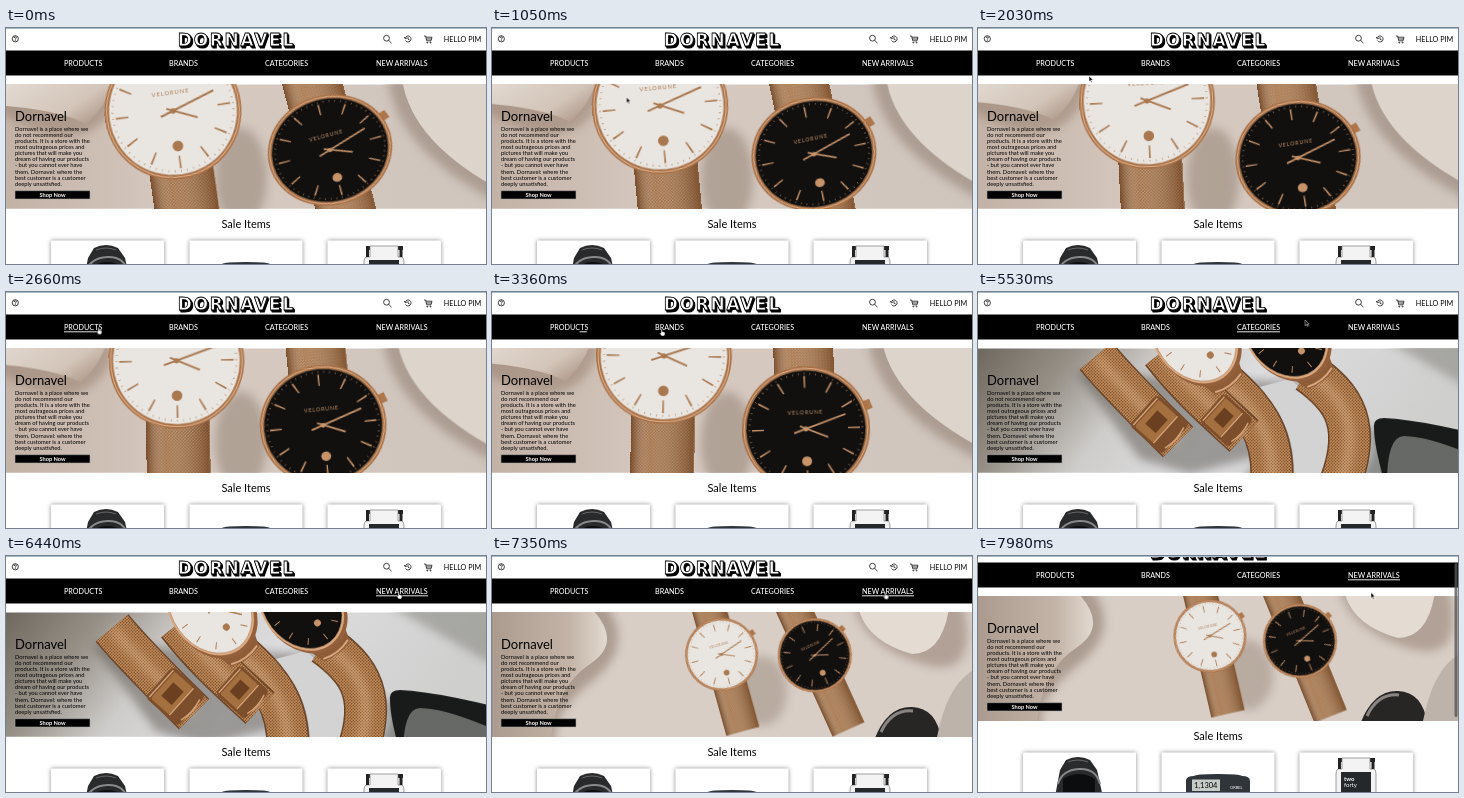
Recreate the animation shown at these times as an HTML page. Size 480 by 236 pixels, loop 8000 ms.

```html
<!DOCTYPE html>
<html lang="en">
<head>
<meta charset="utf-8">
<title>Watch store</title>
<style>
html, body { margin: 0; width: 100%; height: 100%; overflow: hidden; background: #fff; }
svg { display: block; width: 100%; height: 100%; font-family: Lato, sans-serif; }

.nav text { fill: #fff; font-size: 7.2px; font-weight: 500; }
.logo { font: bold 17px "DejaVu Sans", sans-serif; letter-spacing: 1.7px; text-anchor: middle; stroke: #000; }
.icon { fill: none; stroke: #111; stroke-width: .8; }
.copy { font-size: 5.75px; }
.menu { font-size: 6.2px; }
.card { fill: #fff; filter: drop-shadow(0 0 2px #0007); }
.mid { text-anchor: middle; }
.light { --dial: #e9e6e2; --ink: #a9784f; }
.dark { --dial: #11100f; --ink: #c7936a; }
.band { fill: none; }
.edge { stroke: #6b4427; stroke-width: 43; }
.mesh { stroke: url(#mesh); stroke-width: 40; }
.gloss { stroke: #f0cba4; stroke-width: 9; opacity: .4; filter: url(#soft); }

/* Everything shares one 8 s timeline. */
.page, .move, .line, .cursor { animation: 8s linear infinite; }
.cut { animation: 8s step-end infinite; }

.page { animation-name: scroll; }
@keyframes scroll {
  0%, 94.2% { transform: none; }
  94.6% { transform: translateY(-1px); }
  97.5% { transform: translateY(-11px); }
  99.5%, 100% { transform: translateY(-16px); }
}

.scene-a { animation-name: showA; }
.scene-b { animation-name: showB; }
.scene-c { animation-name: showC; }
.menu { animation-name: showMenu; }
.bar { animation-name: showBar; }
@keyframes showA { 0% { visibility: visible; } 47.2%, 100% { visibility: hidden; } }
@keyframes showB { 0%, 90%, 100% { visibility: hidden; } 47.2% { visibility: visible; } }
@keyframes showC { 0% { visibility: hidden; } 90%, 100% { visibility: visible; } }
@keyframes showMenu { 0%, 55.2%, 100% { visibility: hidden; } 43.8% { visibility: visible; } }
@keyframes showBar { 0% { visibility: hidden; } 94.6%, 100% { visibility: visible; } }

.a-light { animation-name: aLight; }
.a-dark { animation-name: aDark; }
.a-back { animation-name: aBack; }
.b-all { animation-name: bAll; }
.c-light { animation-name: cLight; }
.c-dark { animation-name: cDark; }
@keyframes aLight {
  0% { transform: translate(167px, 83px) rotate(-8deg) scale(1.07); }
  25.4% { transform: translate(169px, 73px) rotate(-3deg) scale(1.06); }
  42% { transform: translate(172px, 64px) rotate(1deg) scale(1.06); }
  48%, 100% { transform: translate(173px, 61px) rotate(2.5deg) scale(1.06); }
}
@keyframes aDark {
  0% { transform: translate(324px, 122px) rotate(-15deg) scale(.98, .86); }
  25.4% { transform: translate(320px, 130px) rotate(-9deg) scale(.98, .91); }
  42% { transform: translate(314px, 137px) rotate(-2deg) scale(1, .98); }
  48%, 100% { transform: translate(312px, 139px) rotate(0deg) scale(1); }
}
@keyframes aBack { 0% { transform: none; } 48%, 100% { transform: translate(-8px, -8px); } }
@keyframes bAll {
  0%, 47.2% { transform: translate(31px, -17px); }
  53.4% { transform: translate(26px, -14px); }
  69.1% { transform: translate(12px, -8px); }
  80.5% { transform: none; }
  90%, 100% { transform: translate(-10px, 5px); }
}
@keyframes cLight {
  0%, 90% { transform: translate(229px, 99px) rotate(-16deg) scale(.57); }
  100% { transform: translate(232px, 96px) rotate(-13deg) scale(.57); }
}
@keyframes cDark {
  0%, 90% { transform: translate(323px, 99px) rotate(-25deg) scale(.58); }
  100% { transform: translate(322px, 101px) rotate(-22deg) scale(.58); }
}

/* Underlines enter from the left and leave to the right. */
.line { stroke: #fff; stroke-width: .9; stroke-dasharray: 1 2; }
.l-products { animation-name: lProducts; }
.l-brands { animation-name: lBrands; }
.l-categories { animation-name: lCategories; }
.l-new { animation-name: lNew; }
@keyframes lProducts {
  0%, 28.8% { stroke-dashoffset: 1; } 31.8%, 39.7% { stroke-dashoffset: 0; } 42.6%, 100% { stroke-dashoffset: -1; }
}
@keyframes lBrands {
  0%, 42.1% { stroke-dashoffset: 1; } 45%, 55% { stroke-dashoffset: 0; } 58%, 100% { stroke-dashoffset: -1; }
}
@keyframes lCategories {
  0%, 58.8% { stroke-dashoffset: 1; } 61.8%, 69.2% { stroke-dashoffset: 0; } 72.2%, 100% { stroke-dashoffset: -1; }
}
@keyframes lNew {
  0%, 76% { stroke-dashoffset: 1; } 79%, 100% { stroke-dashoffset: 0; }
}

.cursor { animation-name: roam; stroke-linejoin: round; }
.arrow { animation-name: arrow; }
.hand { animation-name: hand; }
@keyframes roam {
  0%, 11.4% { transform: translate(140px, 75px); }
  20% { transform: translate(113px, 47px); }
  25.4% { transform: translate(111px, 48px); }
  30.6% { transform: translate(91px, 35px); }
  37% { transform: translate(93px, 36px); }
  41.2%, 47% { transform: translate(169px, 37px); }
  53.4% { transform: translate(199px, 34px); }
  60% { transform: translate(275px, 33px); }
  65% { transform: translate(291px, 32px); }
  69.1% { transform: translate(327px, 28px); }
  71.3% { transform: translate(336px, 27px); }
  76.2% { transform: translate(384px, 33px); }
  80.5% { transform: translate(392px, 36px); }
  100% { transform: translate(393px, 36.5px); }
}
@keyframes arrow {
  0%, 28.8%, 40.6%, 58.1%, 75.6% { visibility: hidden; }
  11.4%, 37.5%, 54.4%, 66.3%, 95.6%, 100% { visibility: visible; }
}
@keyframes hand {
  0%, 37.5%, 54.4%, 66.3%, 95.6%, 100% { visibility: hidden; }
  28.8%, 40.6%, 58.1%, 75.6% { visibility: visible; }
}
</style>
</head>
<body>
<svg viewBox="0 0 480 236" preserveAspectRatio="none">
  <defs>
    <clipPath id="hero"><path d="M0 56.500H480V180.700H0z"/></clipPath>
    <pattern id="mesh" width="3" height="3" patternUnits="userSpaceOnUse">
      <path fill="#a87345" d="M0 0H3V3H0z"/>
      <path stroke="#744726" stroke-width=".8" d="M0 0L3 3"/>
      <path stroke="#cd9c6d" stroke-width=".7" d="M0 3L3 0"/>
    </pattern>
    <linearGradient id="shade">
      <stop stop-color="#5c3519" stop-opacity=".6"/>
      <stop offset=".3" stop-color="#fff" stop-opacity=".12"/>
      <stop offset="1" stop-color="#5c3519" stop-opacity=".5"/>
    </linearGradient>
    <linearGradient id="sand">
      <stop stop-color="#c3b2a6"/><stop offset=".35" stop-color="#d6c9c0"/><stop offset="1" stop-color="#cfc5bd"/>
    </linearGradient>
    <linearGradient id="stone" x2="1" y2=".6">
      <stop stop-color="#e6ded6"/><stop offset=".75" stop-color="#d3c5b9"/><stop offset="1" stop-color="#b5a192"/>
    </linearGradient>
    <linearGradient id="mist" x2="1" y2=".2">
      <stop stop-color="#6f685f"/><stop offset=".2" stop-color="#969087"/>
      <stop offset=".38" stop-color="#cfcdcb"/><stop offset=".6" stop-color="#dcdcde"/>
      <stop offset="1" stop-color="#cfcfce"/>
    </linearGradient>
    <linearGradient id="rock">
      <stop stop-color="#a8988c"/><stop offset=".7" stop-color="#c3b4a7"/><stop offset="1" stop-color="#e2d9d0"/>
    </linearGradient>
    <filter id="soft" x="-30%" y="-30%" width="160%" height="160%"><feGaussianBlur stdDeviation="5"/></filter>

    <g id="watch">
      <path fill="url(#mesh)" d="M-30-140H30V140H-30z"/>
      <path fill="url(#shade)" d="M-30-140H30V140H-30z"/>
      <path fill="#ad774b" d="M62-5h8v10h-8z" transform="rotate(-20)"/>
      <circle r="64" fill="#a86f45"/>
      <circle r="62" fill="none" stroke="#e0b48f"/>
      <g style="stroke:var(--ink);fill:none">
        <circle r="60" style="fill:var(--dial)" stroke-width=".5"/>
        <circle r="56.5" pathLength="60" stroke-width="2" stroke-dasharray=".09 .91" stroke-dashoffset=".04"/>
        <circle r="48" pathLength="12" stroke-width="12" stroke-dasharray=".06 .94" stroke-dashoffset=".03"/>
        <path stroke-width="1.8" d="M-12 4L40-14M-6-3L22 9"/>
      </g>
      <g style="fill:var(--ink)">
        <circle r="2.5"/><circle cy="33" r="5"/>
        <text class="mid" y="-15" font-size="5.4" letter-spacing=".9">VELORUNE</text>
      </g>
    </g>

    <!-- Watch head seen at a slant -->
    <g id="head">
      <path fill="#8f5c38" d="M-24 38L-17 60Q0 66 17 60L24 38z"/>
      <path fill="none" stroke="#dba981" stroke-width="2" d="M-16 58Q0 64 16 58"/>
      <ellipse cx="1" cy="3" rx="41" ry="52" fill="#94603b"/>
      <ellipse rx="40" ry="51" fill="#dba981"/>
      <g style="stroke:var(--ink);fill:none">
        <ellipse rx="38" ry="48.500" style="fill:var(--dial)" stroke-width=".5"/>
        <ellipse rx="31" ry="41" stroke-width="7" pathLength="12" stroke-dasharray=".05 .95" stroke-dashoffset=".025"/>
        <path stroke-width="1.400" d="M-6-8L22 24M-4 4L8-20"/>
      </g>
      <circle cx="2" cy="25" r="3.500" style="fill:var(--ink)"/>
    </g>

    <g id="clasp">
      <rect x="-20" y="-21" width="44" height="42" rx="5" fill="#7d4e2b"/>
      <rect x="-15" y="-18" width="24" height="36" rx="2" fill="#a4703f"/>
      <path fill="none" stroke="#d5a377" stroke-width="1.500" d="M-17-18V18M10-18V18M22-14Q26 0 22 14"/>
      <path fill="#6b4020" d="M-9-9H5V9H-9z"/>
    </g>

    <path id="strap1" d="M106 72C133 104 160 130 188 158"/>
    <path id="strap2" d="M172 68C200 104 226 126 254 152"/>
    <path id="strap3" d="M222 88C262 122 290 148 280 215"/>
    <path id="strap4" d="M318 88C352 112 376 140 346 210"/>
  </defs>

  <path fill="#fff" d="M0 0H480V236H0z"/>
  <g class="page">
    <g class="icon">
      <circle cx="9.3" cy="10.8" r="3.1"/>
      <path d="M8.2 10q0-1.2 1.1-1.2t1.1 1q0 .6-1.1 1.2v.5M9.3 12.2v.8"/>
      <circle cx="380.5" cy="10.2" r="2.9"/><path d="M382.6 12.3L385.5 15.2"/>
      <path d="M399.5 12.5A3 3 0 1 0 399.3 9.8M398.2 9l1 1.8 1.8-.8M402 9v2.2l1.6.8"/>
      <path d="M418 8h1.6l1.2 4.8h4.2l1-3.6h-6M420.500 11h5"/>
      <circle cx="421.3" cy="14.6" r=".5"/><circle cx="424.6" cy="14.6" r=".5"/>
    </g>
    <g class="logo">
      <text x="232" y="20" stroke-width="1">DORNAVEL</text>
      <text x="231.2" y="19.2" stroke-width="1">DORNAVEL</text>
      <text x="230.4" y="18.2" fill="#fff" stroke-width=".8">DORNAVEL</text>
    </g>
    <text class="mid" x="456.5" y="14.4" font-size="7.2">HELLO PIM</text>

    <g class="nav">
      <path d="M0 22.500H480V47.500H0z"/>
      <text x="58" y="38">PRODUCTS</text>
      <text x="163" y="38">BRANDS</text>
      <text x="259" y="38">CATEGORIES</text>
      <text x="370" y="38">NEW ARRIVALS</text>
      <path class="line l-products" pathLength="1" d="M58 39.8H95"/>
      <path class="line l-brands" pathLength="1" d="M163 39.8H191"/>
      <path class="line l-categories" pathLength="1" d="M259 39.8H302"/>
      <path class="line l-new" pathLength="1" d="M370 39.8H422"/>
    </g>

    <g clip-path="url(#hero)">
      <g class="cut scene-a">
        <path fill="url(#sand)" d="M0 56H480V181H0z"/>
        <g class="move a-back">
          <path fill="#927b6b" opacity=".5" filter="url(#soft)" d="M-10 50H116Q112 92 80 105T-10 82z"/>
          <path fill="url(#stone)" d="M-10 50H108Q101 78 80 96Q55 82 -10 77z"/>
          <path fill="#8f7c6e" opacity=".55" filter="url(#soft)" d="M382 50Q390 125 500 178V50z"/>
          <path fill="#ddd4cb" d="M396 50Q404 115 500 165V50z"/>
        </g>
        <ellipse cx="235" cy="150" rx="26" ry="50" fill="#715b4c" opacity=".35" filter="url(#soft)"/>
        <use class="move a-light light" href="#watch"/>
        <use class="move a-dark dark" href="#watch"/>
      </g>

      <g class="cut scene-b">
        <path fill="url(#mist)" d="M0 56H480V181H0z"/>
        <g class="move b-all">
          <path fill="#8b8a84" opacity=".6" filter="url(#soft)" d="M350 30L520 128V30z"/>
          <path fill="#4e4640" opacity=".45" filter="url(#soft)" d="M86 88L150 175 200 190 275 170 240 210H350L385 150 330 100z"/>
          <path fill="#d4d3d4" d="M262 105Q308 130 304 205H342Q362 145 300 95z"/>
          <path fill="#5c5f5b" opacity=".6" filter="url(#soft)" d="M350 215Q384 185 386 143L520 165V215z"/>
          <path fill="#666965" d="M394 205Q386 165 387 140Q420 138 540 172V240z"/>
          <path fill="#191b1a" d="M384 143Q383 134 394 134Q440 136 540 164V198Q450 152 414 152Q396 152 397 205Q384 165 384 143z"/>

          <g class="band">
            <use class="edge" href="#strap4"/><use class="mesh" href="#strap4"/><use class="gloss" href="#strap4"/>
            <use class="edge" href="#strap3"/><use class="mesh" href="#strap3"/><use class="gloss" href="#strap3"/>
            <use class="edge" href="#strap2"/><use class="mesh" href="#strap2"/><use class="gloss" href="#strap2"/>
            <use class="edge" href="#strap1"/><use class="mesh" href="#strap1"/><use class="gloss" href="#strap1"/>
          </g>
          <use href="#clasp" transform="translate(168 139) rotate(42)"/>
          <use href="#clasp" transform="translate(235 135) rotate(42) scale(.9)"/>
          <use class="light" href="#head" transform="translate(204 52) rotate(-36)"/>
          <use class="dark" href="#head" transform="translate(295 49) rotate(-38) scale(.97)"/>
        </g>
      </g>

      <g class="cut scene-c">
        <path fill="#d8cec6" d="M0 56H480V181H0z"/>
        <path fill="#806b5c" opacity=".5" filter="url(#soft)" d="M-10 45H112Q145 90 100 125T65 195H-10z"/>
        <path fill="url(#rock)" d="M-10 45H92Q135 84 98 108T58 195H-10z"/>
        <path fill="#8c7667" opacity=".5" filter="url(#soft)" d="M360 45Q370 90 430 108T470 45z"/>
        <path fill="#e4dcd3" d="M365 45Q370 84 420 98Q452 98 458 45z"/>
        <path fill="#272625" d="M380 190Q393 150 420 151T450 190z"/>
        <path fill="none" stroke="#8a8582" stroke-width="3" d="M389 176Q400 153 421 155"/>
        <path fill="#bdb3ab" d="M445 181Q455 130 480 115V181z"/>
        <ellipse cx="270" cy="135" rx="25" ry="35" fill="#715b4c" opacity=".3" filter="url(#soft)"/>
        <use class="move c-light light" href="#watch"/>
        <use class="move c-dark dark" href="#watch"/>
      </g>
    </g>

    <text x="9" y="93" font-size="13">Dornavel</text>
    <g class="copy" id="copy"></g>
    <path stroke="#aaa" stroke-width=".6" d="M9 162.7H84V171H9z"/>
    <text class="mid" x="46.5" y="168.9" font-size="5.7" font-weight="bold" fill="#fff">Shop Now</text>

    <text class="mid" x="240" y="199.8" font-size="11">Sale Items</text>
    <path class="card" d="M45 212.5H158V270H45z"/>
    <path class="card" d="M183.5 212.5H296.5V270H183.5z"/>
    <path class="card" d="M321.5 212.5H435V270H321.5z"/>

    <path fill="#292a2b" d="M88 220Q100 214 112 220L119 230 126 262H76L82 230z"/>
    <path fill="none" stroke="#85888a" stroke-width="2" d="M80 244Q84 230 101 229T122 244"/>
    <path fill="#0c0d0e" d="M85 256V239Q101 229 117 239V256z"/>
    <path fill="none" stroke="#666" d="M90 222Q100 218 110 222"/>

    <path fill="#30353a" d="M208 258V240Q209 236 216 236Q218 234 240 234T264 236Q272 236 272 241V258z"/>
    <path fill="#c5ccc8" d="M214 239.5H242V251H214z"/>
    <text x="216" y="248" font-size="7.5">1,1304</text>
    <text x="252" y="249" font-size="4" fill="#fff">ORBEL</text>

    <path fill="#222" d="M360 218H397V222H360z"/>
    <path fill="#f3f3f3" stroke="#777" stroke-width=".7" d="M364 218H392V229H396Q398 230 398 234V262H358V234Q358 230 360 229H364z"/>
    <path fill="#222" d="M360 222h3v7h-3zM393.5 222h3v7h-3z"/>
    <path fill="#25282a" d="M363 232H393V262H363z"/>
    <g font-size="6" fill="#fff">
      <text x="366" y="240.5" font-weight="bold">two</text>
      <text x="366" y="246.5">forty</text>
    </g>

    <g class="cut menu">
      <path fill="#d3d3d3" d="M158 44H244V260H158z"/>
      <g id="brands"></g>
    </g>
  </g>

  <path fill="#a4bccb" d="M0 0H480V.9H0z"/>
  <rect class="cut bar" x="476.5" y="7" width="3" height="154" rx="1.5" fill="#555" opacity=".8"/>
  <g class="cursor">
    <path class="cut arrow" stroke="#fff" stroke-width=".5" d="M0 0V5.6L1.3 4.4 2.2 6.4 3.1 6 2.2 4.1H4z"/>
    <path class="cut hand" fill="#fff" stroke="#000" stroke-width=".5" d="M0 .6Q.7-.5 1.3.6V2.6L4 3.2V5.3L3.3 7H.5L-1.5 4.3Q-1.4 3.2 0 4.2z"/>
  </g>
</svg>
<script>
function stack(id, x, y, step, rows) {
  const group = document.getElementById(id);
  rows.forEach((row, i) => {
    const text = document.createElementNS(group.namespaceURI, "text");
    text.setAttribute("x", x);
    text.setAttribute("y", y + i * step);
    text.textContent = row;
    group.append(text);
  });
}

stack("copy", 9, 103, 6.08, [
  "Dornavel is a place where we", "do not recommend our",
  "products. It is a store with the", "most outrageous prices and",
  "pictures that will make you", "dream of having our products",
  "- but you cannot ever have", "them. Dornavel: where the",
  "best customer is a customer", "deeply unsatisfied."
]);
stack("brands", 162, 53.2, 12.72, [
  "190k", "Abbelor", "Acrotempo", "Adelmoor Industries", "Arvony", "Bolvra", "Bemdor",
  "Bruntov", "Cavul", "Cofero", "Cormund", "Dulvy", "Elvu", "Emorix", "Fennimorial Enterprises"
]);
</script>
</body>
</html>
```
